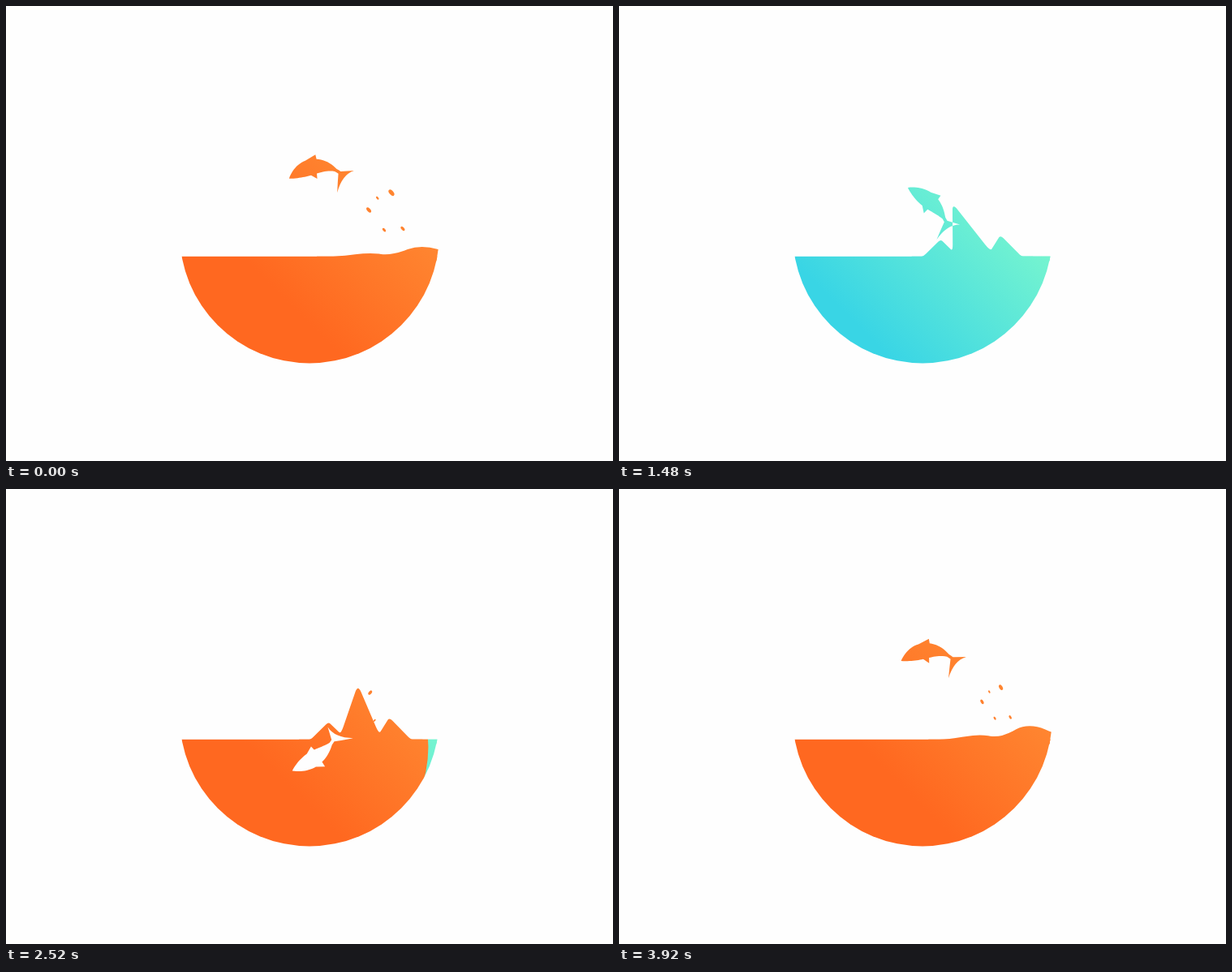
These frames come from a looping animation (748x561 px, 3.96 s). An HTML page with a canvas:

```html
<!DOCTYPE html>
<html lang="en">
<head>
<meta charset="utf-8">
<title>Fish bowl</title>
<style>
  html, body { margin: 0; width: 100%; height: 100%; overflow: hidden; background: #fefefe; }
  canvas { display: block; width: 748px; height: 561px; }
</style>
</head>
<body>
<canvas id="stage" width="748" height="561"></canvas>
<script>
const ctx = document.getElementById('stage').getContext('2d');
const LOOP = 3960, HALF = LOOP / 2, STEP = 40;
const W = 748, H = 561, LEVEL = 308.8;
const RAD = Math.PI / 180;
const DIVE = 420, LEAP = 1280;

const clamp = v => Math.min(1, Math.max(0, v));

function gradient(from, to, start) {
  const g = ctx.createLinearGradient(255, 355, 420, 190);
  g.addColorStop(start, from);
  g.addColorStop(1, to);
  return g;
}
const ORANGE = gradient('#ff6820', '#ff8530', .25);
const CYAN = gradient('#39d5e5', '#77f5cf', 0);

// Drops of each splash: flight in x, flight in y, radius
const diveDrops = [[10, -138, 5.2], [28, -103, 4.5], [54, -115, 2.5], [72, -105, 4], [57, -81, 2]];
const leapDrops = [[17, -112, 4.6], [-4, -104, 2.3], [-17, -86, 3.8], [6, -56, 2.8], [34, -58, 3.2]];

// A tall crest between two lower ones, spreading to the right as it sinks
function wave(age, lean) {
  if (age <= 0) return;
  const x = 400 + .28 * age;
  const gap = 36 + .36 * (x - 433);
  const top = 79 * Math.exp(-(((age - 185) / 165) ** 2)) * clamp(age / 60);
  const round = Math.min(.45, age / 800);
  const tilt = lean * clamp(1 - age / 380);
  const pt = (dx, h) => [x + dx * gap, LEVEL - h * top];
  const pts = [
    pt(-2, 0), pt(-1.6, 0), pt(-1, .32), pt(-.58, .1), pt(0, 1),
    pt(.72, .1), pt(1.07, .4), pt(1.8, 0), pt(2.2, 0)
  ];
  pts[4][0] -= tilt;

  const mix = (a, b) => [a[0] + (b[0] - a[0]) * round, a[1] + (b[1] - a[1]) * round];
  ctx.beginPath();
  ctx.moveTo(pts[0][0], LEVEL + 6);
  ctx.lineTo(...pts[0]);
  for (let i = 1; i < pts.length - 1; i++) {
    ctx.lineTo(...mix(pts[i], pts[i - 1]));
    ctx.quadraticCurveTo(...pts[i], ...mix(pts[i], pts[i + 1]));
  }
  ctx.lineTo(...pts[pts.length - 1]);
  ctx.lineTo(pts[pts.length - 1][0], LEVEL + 6);
  ctx.fill();
}

function water(p) {
  ctx.save();
  ctx.beginPath();
  ctx.arc(374, 280.4, 160, 0, 7);
  ctx.clip();
  ctx.fillRect(200, LEVEL, 350, 140);
  wave(p - DIVE, 0);
  wave((p - LEAP) * .57, 30);
  wave((p + HALF - LEAP) * .57, 30);
  ctx.restore();
}

// Drops shoot out, slow down, turn and fade
function splash(drops, x, y, time, stagger, turn) {
  drops.forEach(([dx, dy, size], i) => {
    const age = time - i * stagger;
    const fade = clamp((480 - age) / 250);
    if (age <= 0 || !fade) return;
    const out = 1 - Math.exp(-age / 70);
    const r = size * clamp(age / 100) * Math.cbrt(fade);
    ctx.globalAlpha = Math.sqrt(fade);
    ctx.beginPath();
    ctx.ellipse(
      x + dx * out + .05 * age, y + dy * out + 1.4e-4 * age * age,
      r, r * .55, (turn - .25 * age) * RAD, 0, 7);
    ctx.fill();
  });
  ctx.globalAlpha = 1;
}

function fish(p) {
  const swing = (k, deg) => Math.cos(k * p / HALF * 2 * Math.PI - deg * RAD);
  const cx = 379.5 + 4.5 * swing(2, 85);
  const cy = 279 + 83 * swing(1, 163) - 15 * swing(3, 129);
  const head = -44 * swing(1, 43) * RAD;
  const tail = (6 + 65 * swing(1, 310) + 10 * swing(3, 110)) * RAD;
  const len = 62.5, bend = tail - head, chord = head + bend / 3;
  const nx = cx - len / 2 * Math.cos(chord), ny = cy - len / 2 * Math.sin(chord);

  // u runs along the spine, n is the distance towards the back
  const at = (u, n) => {
    const a = head + bend * u * u / 3, b = head + bend * u * u;
    return [nx + len * u * Math.cos(a) + n * Math.sin(b),
            ny + len * u * Math.sin(a) - n * Math.cos(b)];
  };
  const side = (from, to, girth) => {
    for (let i = 0; i <= 12; i++) {
      const u = from + (to - from) * i / 12;
      const n = Math.max(Math.sin(Math.PI * u ** .88), u > .8 ? .2 : 0);
      ctx.lineTo(...at(u, girth * n));
    }
  };
  const base = at(1, 0);
  const lobe = (r, deg) => {
    const a = tail + deg * RAD;
    return [base[0] + r * Math.cos(a), base[1] + r * Math.sin(a)];
  };

  ctx.beginPath();
  ctx.moveTo(nx, ny);
  side(0, .42, 10.4);
  ctx.lineTo(...at(.59, 15));
  side(.6, 1, 10.4);
  ctx.quadraticCurveTo(...lobe(9, -56), ...lobe(18, -52));
  ctx.quadraticCurveTo(...lobe(4, 0), ...lobe(25, 52));
  ctx.quadraticCurveTo(...lobe(12, 56), ...at(1, -2));
  side(1, .58, -9);
  ctx.lineTo(...at(.575, -15));
  side(.44, 0, -9);
  ctx.closePath();
  ctx.fill();
}

function draw(time) {
  const t = Math.floor(time % LOOP / STEP) * STEP;
  const p = t % HALF;
  const [before, after] = t < HALF ? [ORANGE, CYAN] : [CYAN, ORANGE];

  ctx.globalCompositeOperation = 'source-over';
  ctx.clearRect(0, 0, W, H);
  ctx.fillStyle = '#000';
  water(p);
  splash(diveDrops, 440, 330, p - DIVE - 60, 20, 145);
  splash(leapDrops, 455, 320, p - LEAP - 580, 0, 80);
  splash(leapDrops, 455, 320, p + HALF - LEAP - 580, 0, 80);

  // The fish is solid in the air and cut out of the water
  ctx.globalCompositeOperation = 'xor';
  fish(p);

  ctx.globalCompositeOperation = 'source-in';
  ctx.fillStyle = before;
  ctx.fillRect(0, 0, W, H);

  // The new colour spreads from the splash
  ctx.globalCompositeOperation = 'source-atop';
  ctx.fillStyle = after;
  ctx.beginPath();
  ctx.arc(365, 318, Math.max(0, p - 400) * 1.11, 0, 7);
  ctx.fill();

  requestAnimationFrame(draw);
}
requestAnimationFrame(draw);
</script>
</body>
</html>
```
